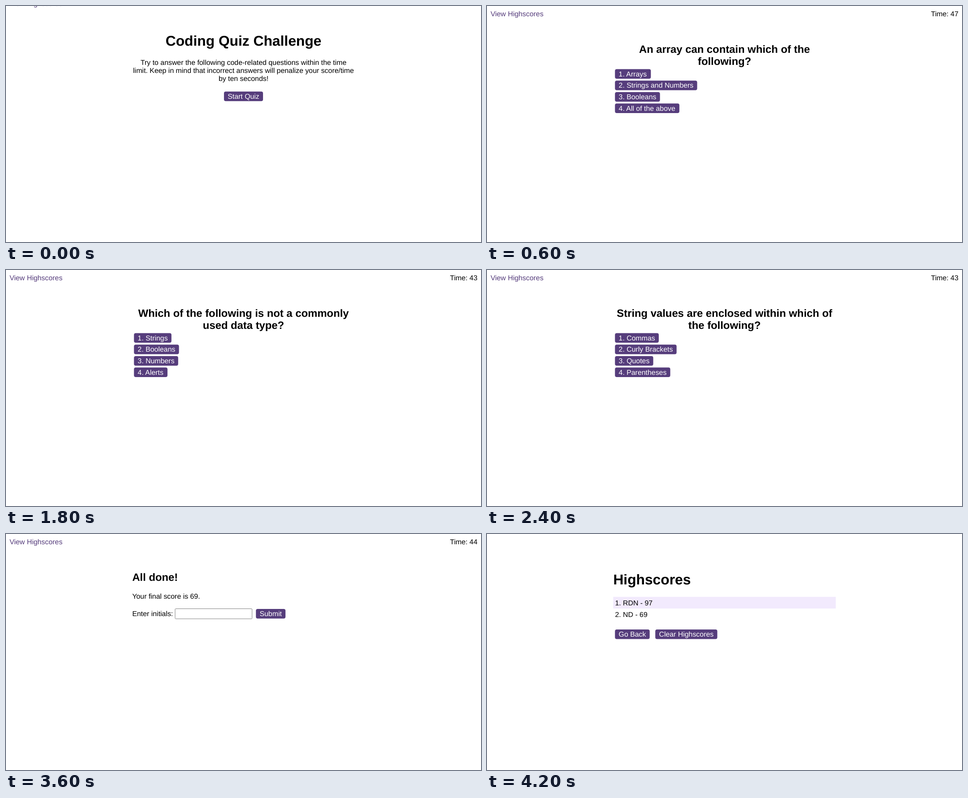
An HTML page that plays this animation: 1059 by 529 pixels, repeating every 4800 ms.

```html
<!DOCTYPE html>
<html lang="en">
<head>
<meta charset="utf-8">
<title>Coding Quiz Challenge</title>
<style>
  html, body { margin: 0; width: 100%; height: 100%; overflow: hidden; background: #fff; }
  svg { display: block; width: 1059px; height: 529px; }
  text { font-family: "Liberation Sans", Arial, sans-serif; text-rendering: geometricPrecision; }
</style>
</head>
<body>
<svg id="stage" viewBox="0 0 1059 529"></svg>
<script>
const SCENE_MS = 600;
const PURPLE = '#563d7c';
const BODY = 15.88, H2 = 23.82, H1 = 31.76;
const LEFT = 281.4, CENTER = 529.5, BUTTON_LEFT = 285.3, BUTTON_PAD = 8.25;

const stage = document.getElementById('stage');
const ruler = document.createElement('canvas').getContext('2d');
ruler.font = `${BODY}px "Liberation Sans", Arial, sans-serif`;

const text = (x, y, content, { size = BODY, anchor = 'start', fill = '#000' } = {}) =>
  `<text x="${x}" y="${y}" font-size="${size}" font-weight="${size > BODY ? 700 : 400}"
    text-anchor="${anchor}" fill="${fill}">${content}</text>`;

const centered = (y, content, size) => text(CENTER, y, content, { size, anchor: 'middle' });

const buttonWidth = label => ruler.measureText(label).width + 2 * BUTTON_PAD;

const button = (x, y, label) =>
  `<rect x="${x}" y="${y}" width="${buttonWidth(label)}" height="21.5" rx="4" fill="${PURPLE}"/>` +
  text(x + BUTTON_PAD, y + 16.2, label, { fill: '#fff' });

const link = y => text(7.94, y, 'View Highscores', { fill: PURPLE });

const header = time => link(22.6) + text(1051, 22.6, `Time: ${time}`, { anchor: 'end' });

const question = (time, lines, answers) =>
  header(time) +
  lines.map((line, i) => centered(105 + i * 27.1, line, H2)).join('') +
  answers.map((answer, i) => button(BUTTON_LEFT, 141.5 + i * 25.7, `${i + 1}. ${answer}`)).join('');

// The start page is scrolled, so only the link's descender remains visible.
const start = () =>
  link(-0.5) +
  centered(89, 'Coding Quiz Challenge', H1) +
  ['Try to answer the following code-related questions within the time',
   'limit. Keep in mind that incorrect answers will penalize your score/time',
   'by ten seconds!'].map((line, i) => centered(132 + i * 18, line)).join('') +
  button(CENTER - buttonWidth('Start Quiz') / 2, 191.8, 'Start Quiz');

const done = () =>
  header(44) +
  text(LEFT, 105, 'All done!', { size: H2 }) +
  text(LEFT, 144.6, 'Your final score is 69.') +
  text(LEFT, 184.4, 'Enter initials:') +
  '<rect x="377" y="167.5" width="171.6" height="22.6" rx="1.5" fill="#fff" stroke="#808080"/>' +
  button(557.2, 168, 'Submit');

const highscores = () =>
  text(LEFT, 112.5, 'Highscores', { size: H1 }) +
  `<rect x="${LEFT}" y="140.8" width="496.2" height="26.2" fill="#f2eafd"/>` +
  text(285.4, 159.6, '1. RDN - 97') +
  text(285.4, 186, '2. ND - 69') +
  button(BUTTON_LEFT, 214, 'Go Back') +
  button(375.2, 214, 'Clear Highscores');

const scenes = [
  start(),
  question(47, ['An array can contain which of the', 'following?'],
    ['Arrays', 'Strings and Numbers', 'Booleans', 'All of the above']),
  question(45, ['An if / else statement is enclosed in which', 'of the following?'],
    ['Quotes', 'Curly Brackets', 'Parentheses', 'Square Brackets']),
  question(43, ['Which of the following is not a commonly', 'used data type?'],
    ['Strings', 'Booleans', 'Numbers', 'Alerts']),
  question(43, ['String values are enclosed within which of', 'the following?'],
    ['Commas', 'Curly Brackets', 'Quotes', 'Parentheses']),
  question(42, ['Which of the following is a debuggers best', 'friend?'],
    ['chopping.log()', 'soggy.log()', 'console.log()', 'slippedOnA.log()']),
  done(),
  highscores()
];

let shown = -1;
function draw(now) {
  const index = Math.floor(now / SCENE_MS) % scenes.length;
  if (index !== shown) stage.innerHTML = scenes[shown = index];
}

const startTime = performance.now();
function tick() {
  draw(performance.now() - startTime);
  requestAnimationFrame(tick);
}
tick();
</script>
</body>
</html>
```
